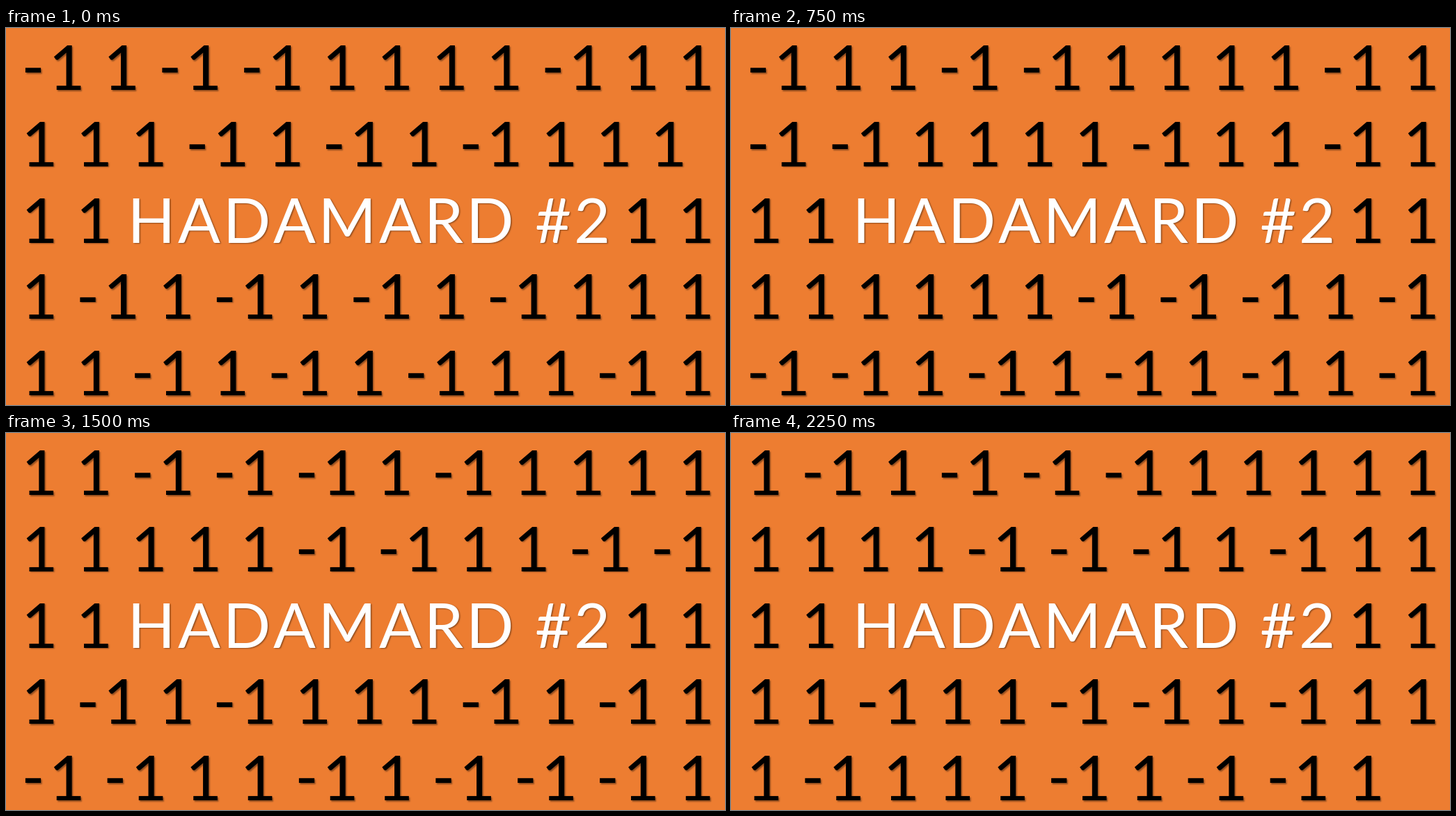
Write an HTML page with a canvas that moves like this. It is 1033 px wide and 542 px high and loops after 3 s.

```html
<!DOCTYPE html>
<html lang="en">
<head>
<meta charset="utf-8">
<title>Hadamard #2</title>
<style>
  html, body { margin: 0; width: 100%; height: 100%; overflow: hidden; background: #ed7d31; }
  canvas { display: block; }
</style>
</head>
<body>
<canvas id="stage" width="1033" height="542"></canvas>
<script>
const stage = document.getElementById('stage');
const ctx = stage.getContext('2d');
const HOLD = 750;
const CELL = 39.3, COLUMNS = 25, LEFT = 48.7;
const TOP = 89, ROW_HEIGHT = 109.75;

// Each scene is one run of signed ones, wrapped like text; T is the title.
const SCENES = [
  '-+--++++-+++++-+-+-+++++T+++-+-+-+-+++++-+-+-++-+',
  '-++--++++-+--++++-++-+++T++++++++---+---+-+-+-+-',
  '++---+-+++++++++--++--++T+++-+-+++-+-+--++-+---+',
  '+-+---+++++++++---+-++++T++++-++--+-+++-+++-+--+',
];
const WORDS = { '+': '1', '-': '-1', T: 'HADAMARD #2' };
const WIDTHS = { '+': 1, '-': 2, T: 17 };

function drawCentered(char, x, baseline) {
  const ink = ctx.measureText(char);
  ctx.fillText(char, x + (ink.actualBoundingBoxLeft - ink.actualBoundingBoxRight) / 2, baseline);
}

function drawWord(sign, x, baseline) {
  const word = WORDS[sign];
  ctx.fillStyle = sign === 'T' ? '#fff' : '#000';
  if (sign === 'T') {
    ctx.letterSpacing = '3.8px';
    ctx.fillText(word, x - 31.5, baseline);
    ctx.letterSpacing = '0px';
  } else {
    if (sign === '-') drawCentered('-', x - 10, baseline - 1.7);
    drawCentered('1', x + (word.length - 1) * CELL, baseline);
  }
}

function drawScene(signs) {
  ctx.shadowColor = 'transparent';
  ctx.fillStyle = '#ed7d31';
  ctx.fillRect(0, 0, stage.width, stage.height);

  ctx.font = '90px Lato, sans-serif';
  ctx.fontKerning = 'none';
  ctx.shadowColor = 'rgba(0, 0, 0, 0.4)';
  ctx.shadowBlur = 2;
  ctx.shadowOffsetX = ctx.shadowOffsetY = 1.5;

  let column = 0, row = 0;
  for (const sign of signs) {
    if (column + WIDTHS[sign] > COLUMNS) {
      column = 0;
      row++;
    }
    drawWord(sign, LEFT + column * CELL, TOP + row * ROW_HEIGHT);
    column += WIDTHS[sign] + 1;
  }
}

const start = performance.now();
let shown = -1;
function tick() {
  const current = Math.floor((performance.now() - start) / HOLD) % SCENES.length;
  if (current !== shown) drawScene(SCENES[shown = current]);
  requestAnimationFrame(tick);
}
tick();
</script>
</body>
</html>
```
